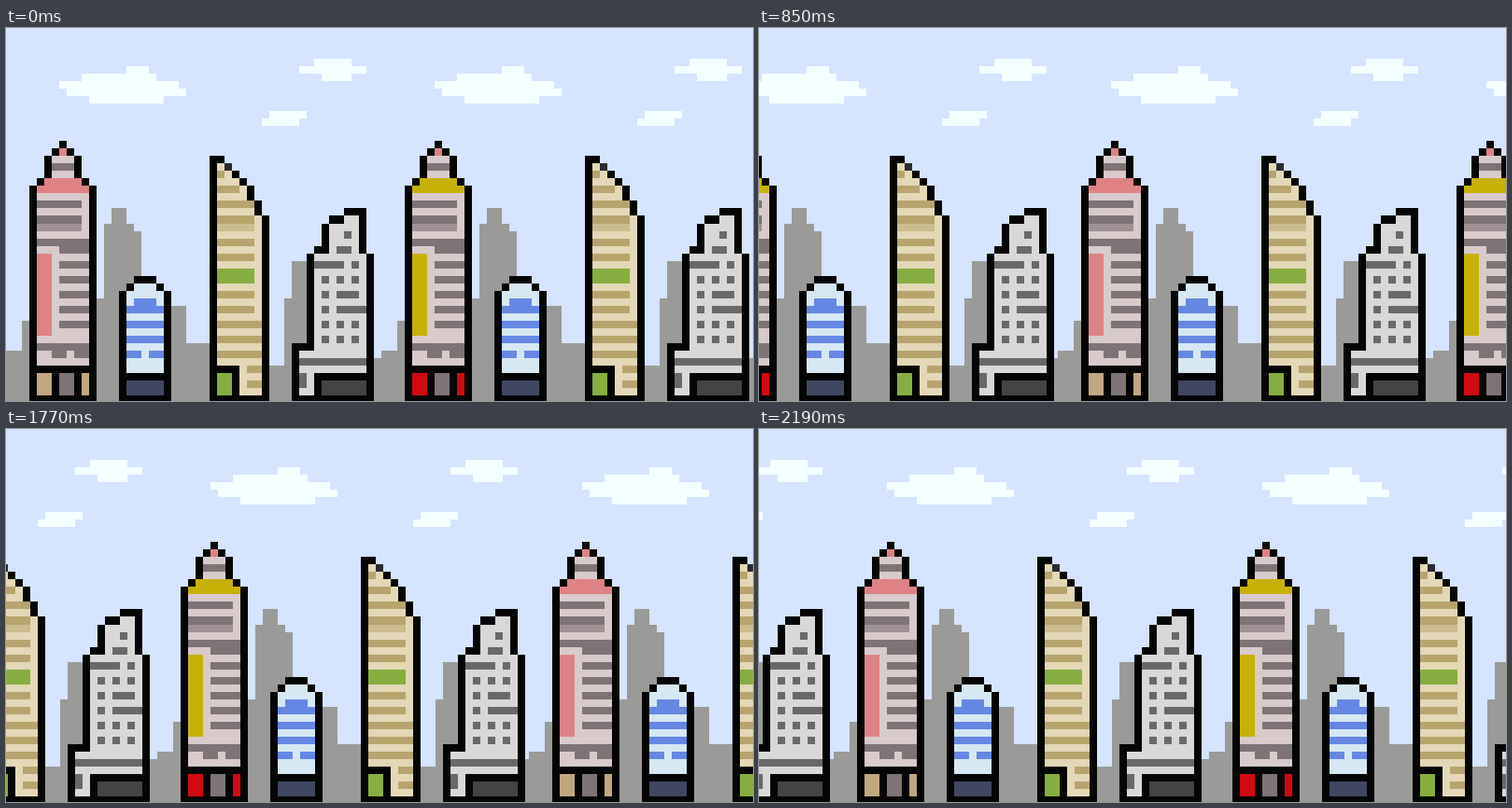
These frames come from a looping animation (800x400 px, 2.26 s). An HTML page with a canvas:

```html
<!DOCTYPE html>
<html lang="en">
<head>
<meta charset="utf-8">
<title>Pixel skyline</title>
<style>
  html, body { margin: 0; width: 100%; height: 100%; overflow: hidden; background: #d5e4ff; }
  canvas { display: block; }
</style>
</head>
<body>
<canvas id="stage" width="800" height="400"></canvas>
<script>
const WIDTH = 800, HEIGHT = 400, CELL = 8.04, TILE = 402, GROUND = 49;
const HOLD = 500, STEP = 70, CYCLE = 1130, SHIFT = 80;
const BLACK = '#050505', PINK = '#de8284';

const stage = document.getElementById('stage').getContext('2d');
const strip = document.createElement('canvas');
strip.width = WIDTH;
strip.height = HEIGHT;
const ink = strip.getContext('2d');
let origin = 0;

const edge = n => Math.floor(0.99 + CELL * n);

// Fills whole cells of the coarse pixel grid.
function paint(color, x, y, w = 1, h = 1) {
  ink.fillStyle = color;
  ink.fillRect(origin + edge(x), edge(y), edge(x + w) - edge(x), edge(y + h) - edge(y));
}

// Every second row from first to last.
function stripes(color, x, w, first, last = first) {
  for (let y = first; y <= last; y += 2) paint(color, x, y, w);
}

// Outlined silhouette: top(i) is the roof row of column i.
// Tall steps on the left side get a filled inner corner.
function building(x, w, color, top) {
  for (let i = 0; i < w; i++) {
    const roof = top(i);
    paint(BLACK, x + i, roof, 1, GROUND + 1 - roof);
    if (i === 0 || i === w - 1) continue;
    const left = top(i - 1), corner = left - roof > 1 ? 1 : 0;
    const inner = Math.max(roof + 1, left + corner, top(i + 1));
    paint(color, x + i, inner, 1, GROUND - inner);
  }
}

function cloud(y, ...runs) {
  runs.forEach(([x, w], i) => paint('#f4ffff', x, y + i, w));
}

function backdrop() {
  const steps = [[0, 43], [2, 39], [3, 36], [13, 26], [14, 24], [16, 26], [17, 27],
    [18, 37], [24, 42], [28, 45], [37, 36], [38, 31], [41, 44], [50]];
  for (let i = 0; i < steps.length - 1; i++) {
    const [x, top] = steps[i];
    paint('#9a9a98', x, top, steps[i + 1][0] - x, 50 - top);
  }
}

function spireTower(accent, door) {
  const dark = '#7e7375';
  building(3, 9, '#d9cacb', i => {
    const d = Math.abs(i - 4);
    return d < 3 ? 15 + d : 17 + d;
  });
  paint(PINK, 7, 16);
  paint(dark, 6, 18, 3);
  paint(accent, 5, 20, 5);
  paint(accent, 4, 21, 7);
  stripes(dark, 4, 6, 23, 25);
  paint('#a09294', 4, 26, 6);
  paint(dark, 4, 28, 7);
  stripes(dark, 7, 4, 29, 39);
  paint(accent, 4, 30, 2, 11);
  paint(dark, 4, 42, 7);
  for (const x of [6, 9]) paint(dark, x, 43, 2);
  paint(BLACK, 4, 45, 7, 4);
  paint(door, 4, 46, 2, 3);
  paint(dark, 7, 46, 2, 3);
  paint(door, 10, 46, 1, 3);
}

function domeTower() {
  const blue = '#6488e4';
  building(15, 7, '#d6e8f3', i => 32 + Math.max(1, Math.abs(i - 3)));
  paint(blue, 17, 36, 3);
  stripes(blue, 16, 5, 37, 41);
  for (const x of [16, 19]) paint(blue, x, 43, 2);
  paint(BLACK, 16, 46, 5);
  paint('#3f4763', 16, 47, 5, 2);
}

function slopeTower() {
  const tan = '#b8a46c', green = '#86ae40';
  building(27, 8, '#e4d8b6', i => Math.max(17, 16 + i + Math.max(0, i - 5)));
  paint('#2a2b33', 29, 18);
  for (let y = 19; y <= 25; y += 2) paint(tan, 28, y, Math.min(5, y - 18));
  paint('#cdbd8d', 28, 26, 5);
  stripes(tan, 28, 5, 28, 30);
  paint(green, 28, 32, 5, 2);
  stripes(tan, 28, 5, 35, 37);
  stripes(tan, 28, 6, 39, 43);
  stripes(tan, 32, 2, 45, 47);
  paint(BLACK, 28, 45, 3, 4);
  paint(green, 28, 46, 2, 3);
}

function stepTower() {
  const dark = '#696969';
  const roofs = [42, 42, 30, 29, 26, 25, 25, 24, 24, 24, 30];
  building(38, roofs.length, '#d8d8d8', i => roofs[i]);
  paint(dark, 45, 27);
  paint(dark, 44, 29, 2);
  paint(dark, 41, 31, 4);
  paint(dark, 46, 31);
  for (let x = 42; x <= 46; x += 2) stripes(dark, x, 1, 33, 41);
  paint(dark, 44, 35, 3);
  paint(dark, 44, 37, 4);
  paint(dark, 39, 44, 9);
  paint(dark, 39, 46, 1, 2);
  paint(BLACK, 41, 46, 7, 3);
  paint('#444444', 42, 47, 6, 2);
}

function block(x, accent, door) {
  origin = x;
  cloud(5, [16, 3], [10, 10], [7, 16], [8, 16], [11, 10]);
  cloud(4, [41, 5], [39, 9], [42, 4]);
  cloud(11, [35, 5], [34, 5]);
  backdrop();
  spireTower(accent, door);
  domeTower();
  slopeTower();
  stepTower();
}

ink.fillStyle = '#d5e4ff';
ink.fillRect(0, 0, WIDTH, HEIGHT);
block(0, PINK, '#c1a680');
block(TILE, '#c8b006', '#d00a10');

function draw(time) {
  const t = time % CYCLE;
  const steps = t < HOLD ? 0 : 1 + Math.floor((t - HOLD) / STEP);
  const x = -SHIFT * steps;
  stage.drawImage(strip, x, 0);
  stage.drawImage(strip, x + WIDTH, 0);
}

let start;
function tick(now) {
  start ??= now;
  draw(now - start);
  requestAnimationFrame(tick);
}
draw(0);
requestAnimationFrame(tick);
</script>
</body>
</html>
```
